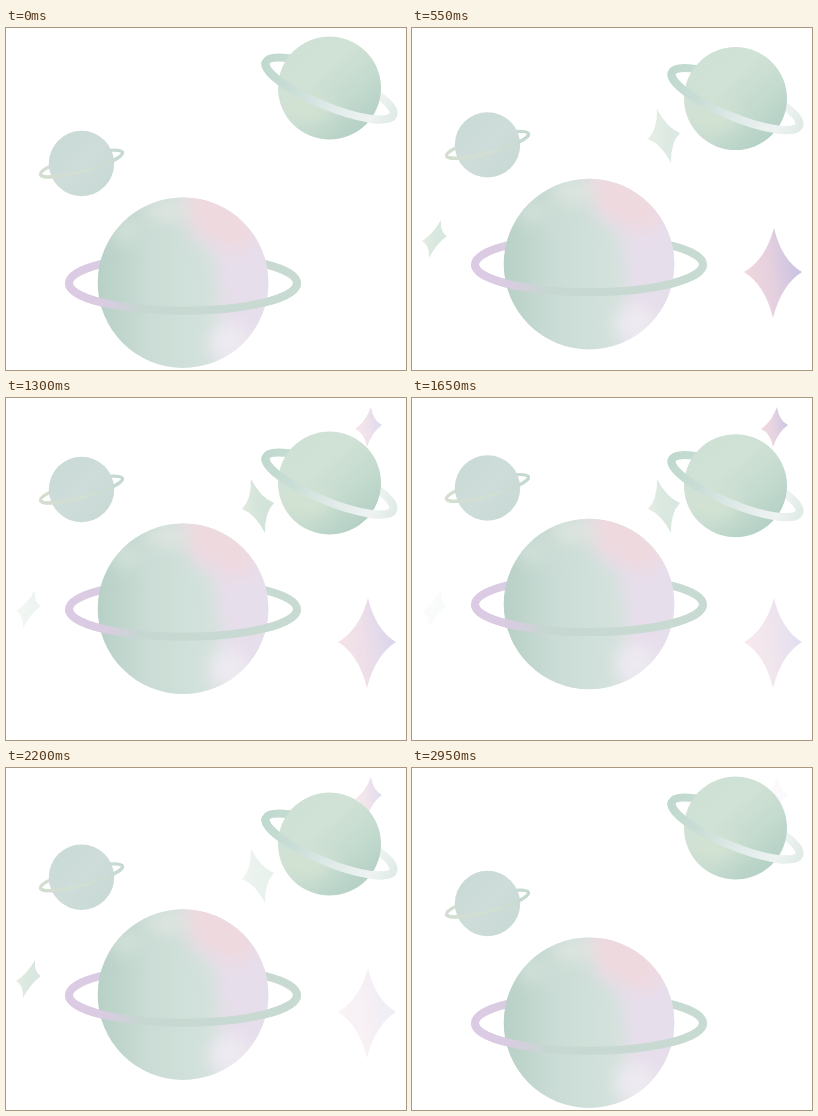
An HTML page for the animation above (3000 ms loop, 400x342 px).

```html
<!DOCTYPE html>
<html lang="en">
<head>
<meta charset="utf-8">
<title>Pastel planets</title>
<style>
  html, body { margin: 0; width: 100%; height: 100%; overflow: hidden; background: #fff; }
  svg { display: block; width: 100%; height: 100%; }
  .ring { fill: none; }
</style>
</head>
<body>
<svg viewBox="0 0 400 342">
  <defs>
    <filter id="soft" x="-60%" y="-60%" width="220%" height="220%"><feGaussianBlur stdDeviation="8"/></filter>
    <clipPath id="bigDisc"><circle r="85.3"/></clipPath>
    <clipPath id="greenDisc"><circle r="51.5"/></clipPath>
    <linearGradient id="bigFill">
      <stop offset="0" stop-color="#b7d0c6"/>
      <stop offset=".3" stop-color="#cadcd5"/>
      <stop offset=".6" stop-color="#d2e1db"/>
      <stop offset="1" stop-color="#dde3e2"/>
    </linearGradient>
    <linearGradient id="bigRing" gradientUnits="userSpaceOnUse" x1="-118" x2="118">
      <stop offset="0" stop-color="#dccae4"/>
      <stop offset=".17" stop-color="#d9cce1"/>
      <stop offset=".32" stop-color="#c6d7d1"/>
      <stop offset="1" stop-color="#c8dbd2"/>
    </linearGradient>
    <linearGradient id="greenFill" x1=".15" y1=".1" x2=".85" y2=".9">
      <stop offset="0" stop-color="#cfe0d5"/>
      <stop offset=".35" stop-color="#d0e1d5"/>
      <stop offset=".65" stop-color="#c5dbcf"/>
      <stop offset="1" stop-color="#b3cfc4"/>
    </linearGradient>
    <linearGradient id="greenRing" gradientUnits="userSpaceOnUse" x1="-70" x2="70">
      <stop offset="0" stop-color="#c0d9ce"/>
      <stop offset=".25" stop-color="#c8ddd6"/>
      <stop offset=".55" stop-color="#dfeae8"/>
      <stop offset=".85" stop-color="#eef3f2"/>
      <stop offset="1" stop-color="#e0ebe6"/>
    </linearGradient>
    <linearGradient id="smallFill" x1="0" y1="0" x2="1" y2="1">
      <stop offset="0" stop-color="#c8dad5"/>
      <stop offset=".5" stop-color="#cedcda"/>
      <stop offset="1" stop-color="#c7d9d3"/>
    </linearGradient>
    <linearGradient id="smallRing" gradientUnits="userSpaceOnUse" x1="-45" x2="45">
      <stop offset="0" stop-color="#d3ddd0"/>
      <stop offset=".5" stop-color="#d3dfd3"/>
      <stop offset="1" stop-color="#c3d9d1"/>
    </linearGradient>
    <linearGradient id="pinkStar" x1="0" y1=".6" x2="1" y2=".4">
      <stop offset=".05" stop-color="#efd6dd"/>
      <stop offset=".45" stop-color="#e5cfdd"/>
      <stop offset=".9" stop-color="#cbc3e2"/>
    </linearGradient>
    <linearGradient id="greenStar">
      <stop offset="0" stop-color="#dfe9dd"/>
      <stop offset=".5" stop-color="#d3e4da"/>
      <stop offset="1" stop-color="#cfe1d8"/>
    </linearGradient>
  </defs>

  <g id="stars"></g>

  <g id="small">
    <g transform="rotate(-15)"><ellipse class="ring" rx="42.5" ry="8" stroke="url(#smallRing)" stroke-width="3.2"/></g>
    <circle r="32.7" fill="url(#smallFill)"/>
    <g transform="rotate(-15)"><path class="ring" d="M-42.5 0A42.5 8 0 0 0 42.5 0" stroke="url(#smallRing)" stroke-width="3.2"/></g>
  </g>

  <g id="green">
    <g transform="translate(0 .5) rotate(22.6)"><ellipse class="ring" rx="69" ry="17.5" stroke="url(#greenRing)" stroke-width="8"/></g>
    <g clip-path="url(#greenDisc)">
      <circle r="52" fill="url(#greenFill)"/>
      <ellipse cx="-20" cy="20" rx="22" ry="11" fill="#d4e3d2" filter="url(#soft)"/>
    </g>
    <g transform="translate(0 .5) rotate(22.6)"><path class="ring" d="M-69 0A69 17.5 0 0 0 69 0" stroke="url(#greenRing)" stroke-width="8"/></g>
  </g>

  <g id="big">
    <ellipse class="ring" cy=".5" rx="114" ry="27.5" stroke="url(#bigRing)" stroke-width="8"/>
    <g clip-path="url(#bigDisc)">
      <circle r="86" fill="url(#bigFill)"/>
      <g filter="url(#soft)">
        <path d="M-4-100L100-100 100 90 34 90 38 12 32-28 6-50Z" fill="#e7deeb"/>
        <path d="M0-100L60-90 76-46 56-30 30-40 6-56Z" fill="#eed9df"/>
        <ellipse cx="-14" cy="-72" rx="22" ry="10" fill="#dfe5e1"/>
        <ellipse cx="46" cy="60" rx="20" ry="20" fill="#edeaf1"/>
        <ellipse cx="-56" cy="-52" rx="16" ry="12" fill="#d0e0d9"/>
      </g>
    </g>
    <path class="ring" d="M-114 .5A114 27.5 0 0 0 114 .5" stroke="url(#bigRing)" stroke-width="8"/>
  </g>
</svg>
<script>
const LOOP = 3000, STEP = 50, LAST = LOOP - STEP;

// Each planet glides from y to y + rise, turns at `turn`, and returns.
const planets = [
  { id: "small", x: 75.5, y: 135.5, rise: -50.8, turn: 1500 },
  { id: "green", x: 323.5, y: 60, rise: 29.8, turn: 1550 },
  { id: "big", x: 177, y: 254.7, rise: -52.4, turn: 1550 }
];

// Tips run top, right, bottom, left; fade lists [time, opacity] pairs.
const stars = [
  { tips: [[362, 200], [390, 244], [361, 290], [332, 244]], fill: "pinkStar",
    fade: [[0, 0], [500, 1], [2950, 0]] },
  { tips: [[245, 81], [268, 105], [259, 135], [236, 111]], fill: "greenStar",
    fade: [[0, 0], [550, .75], [1400, 1], [2950, 0]] },
  { tips: [[29, 192], [35, 208], [17, 230], [10, 213]], fill: "greenStar",
    fade: [[0, 0], [500, .9], [1700, .1], [2150, .9], [2950, 0]] },
  { tips: [[365, 9], [376, 27], [361, 49], [349, 31]], fill: "pinkStar",
    fade: [[0, 0], [1000, 0], [1500, 1], [2950, .1]] }
];

function starPath(tips) {
  const mid = [0, 1].map(k => tips.reduce((sum, p) => sum + p[k], 0) / 4);
  const curves = tips.map((p, i) => {
    const q = tips[(i + 1) % 4];
    const ctrl = mid.map((m, k) => m + .28 * (p[k] + q[k] - 2 * m));
    return `Q${ctrl} ${q}`;
  });
  return `M${tips[0]}${curves.join("")}Z`;
}

function track(keys, t) {
  const i = Math.max(1, keys.findIndex(k => k[0] >= t));
  const [t0, v0] = keys[i - 1], [t1, v1] = keys[i];
  return v0 + (v1 - v0) * (t - t0) / (t1 - t0);
}

for (const p of planets) p.node = document.getElementById(p.id);
for (const s of stars) {
  s.node = document.createElementNS("http://www.w3.org/2000/svg", "path");
  s.node.setAttribute("d", starPath(s.tips));
  s.node.setAttribute("fill", `url(#${s.fill})`);
  document.getElementById("stars").append(s.node);
}

function draw(now) {
  const t = Math.floor(now % LOOP / STEP) * STEP;
  for (const p of planets) {
    const y = p.y + track([[0, 0], [p.turn, p.rise], [LAST, 0]], t);
    p.node.setAttribute("transform", `translate(${p.x} ${y})`);
  }
  for (const s of stars) s.node.setAttribute("opacity", track(s.fade, t));
}

const start = performance.now();
function tick() {
  draw(performance.now() - start);
  requestAnimationFrame(tick);
}
tick();
</script>
</body>
</html>
```
